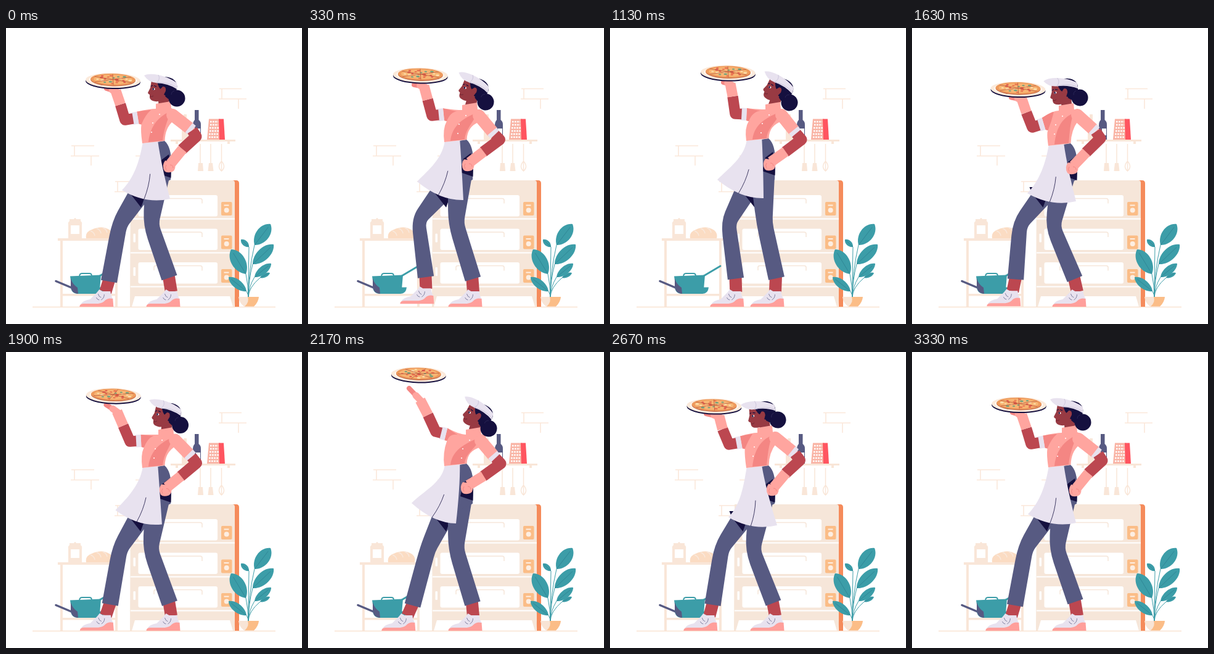
An HTML page that plays this animation: 480 by 480 pixels, repeating every 4 s.

```html
<!DOCTYPE html>
<html lang="en">
<head>
<meta charset="utf-8">
<title>Pizza chef</title>
<style>
html, body { margin: 0; width: 100%; height: 100%; overflow: hidden; background: #fff; }
svg { display: block; width: 100%; height: 100%; }
</style>
</head>
<body>
<svg viewBox="0 0 480 480" fill="none">
  <g stroke="#fbe8da" stroke-width="1.6">
    <path d="M106 191H143M111 191V207.500M105 207.500H151M138 207.500V223M346 98.500H382M350 98.500V115M345 115H390M377 115V131M177 249H202M181 249V265.500M176 265.500H202M210 207.500H225"/>
    <path stroke="#f9e3d2" d="M43 452.500H437"/>
  </g>
  <g id="shelf">
    <path fill="#f9e6d8" d="M267 181h105v3h-105zM275 184h4v4h-4zM359 184h4v4h-4zM288 140h5v11q4 3 4 8v22h-12v-22q0-5 3-8z"/>
    <path fill="#575a82" d="M306 133h6.500v16q4 3 3.500 9v23h-13v-23q0-6 3-9z"/>
    <path fill="#fff" d="M308 163h7v11h-7z"/>
    <path fill="#f9b4a5" d="M329 147.500h18v33.500h-21z"/>
    <path fill="#ff5560" d="M345 147.500h8l2 33.500h-9z"/>
    <path stroke="#fff" stroke-width="2.600" stroke-dasharray="2.600 1.500" d="M331 152h13M331 157h13M330 162h15M330 167h15M329 172h16M329 177h16"/>
    <path stroke="#f9e6d8" stroke-width="1.500" d="M315 188V220M332 188V220M349.500 188V217M349.500 216q-8 9 0 16q8-7 0-16zM349.500 216V232"/>
    <path fill="#f9e6d8" d="M312 219h7l1 13h-9zM329 219h6l1.500 13h-9z"/>
  </g>
  <g id="oven">
    <path fill="#f58b5b" d="M364 247h9q5 0 5 5v200h-7z"/>
    <path fill="#f6e6d9" d="M202 247h165q4 0 4 4v184l-1 17h-2l-5-17h-154l-5 17h-3z"/>
    <path stroke="#fff" stroke-width="1.800" d="M202 309.500h169M202 364.500h169M202 419.500h169"/>
    <g id="decks"></g>
  </g>
  <g id="table">
    <path fill="#f9e6d8" d="M84 341h99v4h-99zM88 345h4v107h-4zM177 345h4v107h-4zM92 431h85v3.500h-85zM103 310h7q2-4 4 0h7v3q3 2 2 6v22h-22v-22q-1-4 2-6z"/>
    <path fill="#fff" d="M105 320h14v14h-14z"/>
    <path fill="#fbdcc3" d="M130 341q-2-10 9-14q17-8 30 1q6 5 4 13z"/>
    <path stroke="#f9e8dc" stroke-width="1.500" d="M137 329q6 2 7 8M147 325q6 2 7 8M157 324q6 2 7 8"/>
    <path stroke="#575a82" stroke-width="3.500" stroke-linecap="round" d="M81 410.500L106 421"/>
    <path stroke="#3c9da8" stroke-width="2.800" stroke-linecap="round" d="M152 402L179 386"/>
    <path stroke="#3c9da8" stroke-width="2" d="M119 404q0-6 4-6h12q4 0 4 4"/>
    <path fill="#3c9da8" d="M104 402.500L154 400.500L152 424H112Q105 415 104 402.500zM105 420.500H160Q159 431 150 431H115Q106 430 105 420.500z"/>
    <path fill="#575a82" d="M105 406Q108 416 116 421L117 431Q106 430 105 420z"/>
  </g>
  <g id="plant">
    <path fill="#f8e4d5" d="M377 436h33q-1 9-8 15.500h-16q-8-6-9-15.500z"/>
    <path fill="#fbbd87" d="M392 436h18q-1 9-8 15.500h-15q8-7 5-15.500z"/>
  </g>
  <g id="chef"></g>
</svg>
<script>
const LOOP = 4000;
const SLATE = '#575a82', NAVY = '#15103f', PINK = '#ffa59f', ROSE = '#f48683',
      ARM = '#bc4750', FACE = '#983a43', LILAC = '#e8e2ef', TEAL = '#3c9da8';
const get = id => document.getElementById(id);

const at = p => p[0].toFixed(2) + ' ' + p[1].toFixed(2);
const add = (p, x, y) => [p[0] + x, p[1] + y];
const mix = (a, b, u) => [a[0] + (b[0] - a[0]) * u, a[1] + (b[1] - a[1]) * u];
const toward = (a, b, len) => mix(a, b, len / Math.hypot(b[0] - a[0], b[1] - a[1]));
const fill = (d, c) => `<path d="${d}" fill="${c}"/>`;
const line = (d, c, w, cap = 'butt') =>
  `<path d="${d}" stroke="${c}" stroke-width="${w}" stroke-linecap="${cap}" stroke-linejoin="round"/>`;
const poly = pts => 'M' + pts.map(at).join('L');
const oval = (x, y, rx, ry, c) => `<ellipse cx="${x}" cy="${y}" rx="${rx}" ry="${ry}" fill="${c}"/>`;

// Fixed scenery
get('decks').innerHTML = [271, 325.5, 380].map((y, i) => `
  <rect x="214.500" y="${y}" width="128.500" height="34.500" rx="3" fill="#fff"/>
  <path d="M240 ${y + 13}v-5q0-2.500 3-2.500h72q3 0 3 3v5" stroke="#f6e6d9" stroke-width="1.500"/>
  <rect x="349" y="${y + 11}" width="17.500" height="22" rx="2" fill="#fbbd87"/>
  <circle cx="357.700" cy="${y + 24.5}" r="4" fill="#fdeee2"/>
  <path d="M353.500 ${y + 16.5}h8" stroke="#fdeee2" stroke-width="2"/>
  ${i ? `<rect x="206.500" y="${y + 8}" width="3.500" height="14" rx="1" fill="#fff"/>` : ''}`).join('');

function leaf(a, b, w) {
  const len = Math.hypot(b[0] - a[0], b[1] - a[1]);
  const nx = -(b[1] - a[1]) / len * w, ny = (b[0] - a[0]) / len * w;
  const p = mix(a, b, .25), q = mix(a, b, .8), k = .72;
  return line(`M393 437Q${at([393, (a[1] + 437) / 2])} ${at(a)}`, TEAL, 1) +
    fill(`M${at(a)}C${at(add(p, nx * k, ny * k))} ${at(add(q, nx * k, ny * k))} ${at(b)}` +
      `C${at(add(q, -nx * k, -ny * k))} ${at(add(p, -nx * k, -ny * k))} ${at(a)}`, TEAL) +
    line(poly([a, mix(a, b, .85)]), '#2c7d8e', .7);
}
get('plant').insertAdjacentHTML('afterbegin',
  leaf([403, 352], [429, 318], 20) + leaf([394, 355], [381, 343], 8) +
  leaf([389, 399], [365, 359], 21) + leaf([400, 383], [434, 351], 18) +
  leaf([403, 404], [430, 382], 12) + leaf([412, 405], [428, 397], 6) +
  leaf([390, 427], [361, 404], 13));

// Each pose: head tilt, waist height, front foot shift, then joint positions
const JOINTS = ['head', 'palm', 'tip', 'wrist', 'elbow', 'cuff', 'neck', 'shoulder', 'cuff2', 'elbow2',
  'wrist2', 'fist', 'hemL', 'hemR', 'knee', 'ankle', 'knee2', 'ankle2'];
const rest = [0, 184, 0, 277, 114, 178, 102, 163, 98, 185.5, 124, 193, 149, 205, 147, 255, 121, 270, 141,
  302, 166, 308.5, 176, 285.5, 197, 265, 225, 188, 263, 266, 277, 184, 318, 167, 411, 235, 319, 265, 405];
const back = [12.7, 182, 30, 288, 120, 188, 94, 172, 92, 194, 116, 201, 142, 211, 141, 262, 123, 277, 142,
  303, 173, 311, 181, 284, 201, 260, 223, 177, 249, 252, 279, 179, 312, 191, 404, 240, 317, 267.5, 407];
const stand = [16.4, 180, 43, 291, 121, 195, 90, 184, 88, 199, 111, 203, 139, 212.5, 139.5, 264, 122, 278, 141,
  302, 171, 310.5, 181, 284, 201, 259, 222, 174, 246, 249, 276, 192, 316, 204, 406.5, 250.5, 317, 270, 406];
const crouch = [-10.4, 188, 2, 272, 113, 178, 115, 161, 112.5, 185.5, 137, 195, 161, 205, 158, 250, 124, 268, 141,
  298, 168, 305.5, 179, 282, 202, 260, 228, 187, 268, 266, 281, 175, 318, 168, 407.5, 228.5, 322, 264, 407];
const toss = [18, 182, 0, 293, 124, 182, 78, 164, 59, 194.5, 102, 207, 129, 215, 131, 268, 124, 280, 144,
  304, 172, 312.5, 181, 284, 201.5, 258, 221, 168, 245, 240, 278, 194, 320, 169.5, 411, 240, 319, 267, 408];
const grab = [-13, 185, 0, 272, 110, 177, 104, 156, 100, 182.5, 125, 193, 150, 204, 148, 251, 121, 268, 139,
  300, 165, 308, 175.5, 284.5, 197, 264, 224, 192, 268, 271, 281, 181, 318, 166.5, 410, 231.5, 321, 265, 407];
const tall = stand.slice();
tall[1] -= 1;
tall[6] -= 3;
tall[10] -= 3;
tall[21] += 1.5;

const POSE_T = [0, 330, 560, 1130, 1630, 2170, 2670, 3270, LOOP];
const POSES = [rest, back, tall, stand, crouch, toss, grab, rest, rest];
const PLATE_T = [0, 330, 560, 1130, 1630, 1880, 2030, 2170, 2230, 2400, 2540, 2670, 3230, LOOP];
const PLATE_X = [173.5, 182.3, 191, 191.5, 172, 174, 177, 179.3, 179.3, 176, 172, 169, 173.5, 173.5];
const PLATE_Y = [85.5, 77, 68, 73, 99.5, 74, 50, 37, 35, 45, 67, 88, 85.5, 85.5];

// Monotone cubic track: eases at turning points, flows through the others
function track(ts, vs, t) {
  let i = 0;
  while (i < ts.length - 2 && t >= ts[i + 1]) i++;
  const slope = k => (vs[k + 1] - vs[k]) / (ts[k + 1] - ts[k]);
  const tangent = k => {
    if (k < 1 || k > ts.length - 2) return 0;
    const a = slope(k - 1), b = slope(k);
    return a * b <= 0 ? 0 : 2 * a * b / (a + b);
  };
  const h = ts[i + 1] - ts[i], u = (t - ts[i]) / h, w = 1 - u;
  return (1 + 2 * u) * w * w * vs[i] + u * w * w * h * tangent(i) +
    u * u * (3 - 2 * u) * vs[i + 1] - u * u * w * h * tangent(i + 1);
}

function poseAt(t) {
  const v = rest.map((_, k) => track(POSE_T, POSES.map(p => p[k]), t));
  const j = { tilt: v[0], waist: v[1], step: v[2] };
  JOINTS.forEach((n, k) => j[n] = [v[3 + 2 * k], v[4 + 2 * k]]);
  return j;
}

function leg(hip, knee, hem, wHip) {
  const normal = (a, b) => {
    const l = Math.hypot(b[0] - a[0], b[1] - a[1]);
    return [-(b[1] - a[1]) / l, (b[0] - a[0]) / l];
  };
  const n1 = normal(hip, knee), n2 = normal(knee, hem), nk = mix(n1, n2, .5);
  const side = s => [add(hip, n1[0] * wHip * s, n1[1] * wHip * s),
    add(knee, nk[0] * 13 * s, nk[1] * 13 * s), add(hem, n2[0] * 13.2 * s, n2[1] * 13.2 * s)];
  const [a, b, c] = side(1), [d, e, f] = side(-1);
  return fill(`M${at(a)}L${at(mix(b, a, .25))}Q${at(b)} ${at(mix(b, c, .25))}L${at(c)}L${at(f)}` +
    `L${at(mix(e, f, .1))}Q${at(e)} ${at(mix(e, d, .1))}L${at(d)}z`, SLATE);
}

const shoe = (x, y) => `<g transform="translate(${x.toFixed(2)} ${y.toFixed(2)})">` +
  fill('M2-4Q5-10 17-12L28-23L32-28L37-25L50-25Q51-17 54-13L52-3z', LILAC) +
  fill('M0 0Q0-4.500 6-5H30Q38-6 41-10Q46-15 54-13L55 0z', '#ff9f9b') +
  line('M30-21q1 5 5 6M27-15q2 4 5 4M35-11q5-3 5-9', SLATE, .7) + '</g>';

function head(j) {
  return `<g transform="translate(${at(j.head)}) rotate(${j.tilt.toFixed(2)})">` +
    fill('M-35-28Q-22-38-10-33Q2-28 0-16Q-3 0-14 1L-27-10z', NAVY) +
    '<circle r="13.500" fill="' + NAVY + '"/>' +
    line('M-9-6Q-9-11-4-12', '#35305f', .7) +
    fill('M-41-29L-43-17L-47-9Q-46-6-44-6L-44-1Q-43 4-35 5Q-27 6-21 0L-16-8L-18-24z', FACE) +
    fill('M-32-27Q-29-16-26-15L-23-19Q-17-20-18-12L-21-6Q-15-2-11-2L-6-22z', NAVY) +
    oval(-23, -13, 3.4, 4.2, FACE) +
    oval(-37.5, -15, 2.2, 1.6, '#fff') + oval(-38.2, -15, 1.2, 1.7, NAVY) +
    line('M-42-19.500L-39-21M-37-20.500L-33-19', NAVY, 1.1) +
    line('M-43-3Q-40-2-38-4', '#6b2431', .9) +
    fill('M-53-37Q-46-41-30-38Q-12-34 0-25L0-15Q-14-24-33-25Q-46-26-53-37z', LILAC) +
    line('M-33-25Q-26-31-30-38M-33-25Q-15-27-1-18', '#c8c1d8', .8) + '</g>';
}

function pizza(x, y, spin) {
  let s = `<g transform="translate(${x.toFixed(2)} ${y.toFixed(2)}) rotate(1.500)">` +
    oval(0, 1.5, 44.5, 12, NAVY) + oval(0, -.5, 44.5, 12, '#fbeadb') +
    oval(0, -.5, 39, 10.3, '#fff8f0') + oval(0, -1, 36.5, 10, '#c9704a') +
    oval(0, -2, 36.5, 9.5, '#ee9a5c') + oval(0, -2, 31.5, 7.8, '#f7b573');
  const colors = ['#e0524a', '#fbe0ae', '#6fa07c', '#e8704f'];
  for (let i = 0; i < 22; i++) {
    const a = i * 2.4 + spin, r = 28 * Math.sqrt((i + 1) / 22);
    s += oval((Math.cos(a) * r).toFixed(2), (Math.sin(a) * r * .25 - 2).toFixed(2),
      i % 3 ? 2.2 : 3, i % 3 ? 1 : 1.3, colors[i % 4]);
  }
  for (let i = 0; i < 3; i++) {
    const a = spin + .5 + i * Math.PI / 3, dx = Math.cos(a) * 34, dy = Math.sin(a) * 8.8;
    s += line(poly([[-dx, -dy - 2], [dx, dy - 2]]), '#b9573f', .8);
  }
  return s + '</g>';
}

function legs(j) {
  const lift = -6 * Math.sin(Math.PI * Math.min(43, Math.max(0, j.step)) / 43);
  const footX = 119.3 + j.step, gap = j.knee2[0] - 14, w = j.waist;
  return line(poly([mix(j.ankle, j.knee, .05), [footX + 42, 428 + lift]]), ARM, 20) +
    shoe(footX, 452 + lift) +
    line(poly([mix(j.ankle2, j.knee2, .05), [268, 428]]), ARM, 20) + shoe(227.5, 452) +
    leg([224, 257], j.knee, j.ankle, 18) +
    fill(poly([[gap - 24, 258], [gap - 20, 268], [gap - 2, 291], [gap + 3, 277], [gap + 6, 258]]), NAVY) +
    leg([247, 230], j.knee2, j.ankle2, 20.5) +
    fill(`M222 ${w + 5}L257 ${w - 1}C265 ${w + 6} 268 ${w + 18} 268 ${w + 36}L267 246L228 264z`, SLATE) +
    fill(`M247 ${w + 52}L267.500 ${w + 59}L268 ${w + 38}L264 ${w + 21}L252 ${w + 30}z`, NAVY);
}

function apron(j) {
  const w = j.waist, l = j.hemL, r = j.hemR, mid = [246.3, w];
  const low = add(mix(l, r, .46), 0, 8);
  return fill(`M221.500 ${w + 3}L${at(mid)}Q${at([248 + (r[0] - 247) * .2, w + 38])} ${at(r)}` +
    `Q${at(add(mix(l, r, .5), 0, 16))} ${at(l)}C${at(add(l, 20, -20))} ${at([217, w + 30])} 221.500 ${w + 3}z`, LILAC) +
    line(`M${at(low)}Q${at(add(toward(low, mid, 22), 3, 1))} ${at(toward(low, mid, 42))}`, NAVY, .8);
}

function shirt(j) {
  const w = j.waist, n = j.neck;
  const end = toward(j.elbow, j.cuff, Math.hypot(j.cuff[0] - j.elbow[0], j.cuff[1] - j.elbow[1]) + 9);
  const d = toward(j.elbow, end, 1), ux = d[0] - j.elbow[0], uy = d[1] - j.elbow[1];
  const top = add(end, uy * 10, -ux * 10), bot = add(end, -uy * 10, ux * 10);
  const a = j.tilt * Math.PI / 180, c = Math.cos(a), s = Math.sin(a);
  const jaw = add(j.head, -22 * c + 4 * s, -22 * s - 4 * c);
  return line(poly([jaw, add(n, 1, 4)]), FACE, 17) +
    fill(`M${at(add(n, -12, 2))}Q${at(n)} ${at(add(n, 12, -2))}L${at(add(n, 13, 9))}` +
      `Q${at(add(n, 22, 12))} ${at(add(j.shoulder, 8, -6))}L${at(add(j.shoulder, 1, 10))}` +
      `Q258 ${w - 22} 257.500 ${w - 1}L221 ${w + 3}Q218 ${w - 18} ${at(add(bot, 4, 1))}L${at(bot)}L${at(top)}` +
      `Q${at(add(n, -22, 10))} ${at(add(n, -12, 10))}z`, PINK) +
    fill(`M${at(top)}Q${at(add(n, -24, 12))} ${at(add(n, -20, 12))}Q${at(add(bot, 10, -14))} ${at(add(bot, 4, 1))}L${at(bot)}z`, ROSE) +
    fill(`M${at(add(n, 12, 14))}C${at(add(n, -7, 22))} 234 ${w - 26} 231 ${w + 1}` +
      `L254 ${w - 1}C256 ${w - 20} ${at(add(n, 6, 32))} ${at(add(n, 12, 14))}z`, ROSE) +
    [[-6, 19], [-17, 33], [-19, 48]].map(b => oval(n[0] + b[0], n[1] + b[1], 1, 1, '#fff')).join('') +
    line(poly([j.cuff, end]), LILAC, 20);
}

function frontArm(j) {
  return line(poly([j.wrist, j.elbow, toward(j.cuff, j.elbow, -1)]), ARM, 17.5) +
    line(poly([j.palm, j.wrist]), PINK, 17) +
    line(poly([j.tip, add(j.palm, 1, 1)]), ROSE, 8, 'round') +
    line(poly([mix(j.tip, j.palm, .6), add(j.palm, 2, 2)]), PINK, 11, 'round');
}

function rearArm(j) {
  const cuff = toward(j.cuff2, j.shoulder, 7), w = j.wrist2, f = j.fist;
  return line(poly([j.shoulder, cuff]), PINK, 20, 'round') +
    line(poly([cuff, j.cuff2]), LILAC, 19) +
    line(poly([j.cuff2, j.elbow2, w]), ARM, 18) +
    line(poly([toward(w, j.elbow2, 1), add(f, 2, -5)]), PINK, 17) +
    fill(`M${at(add(f, -7, -10))}L${at(add(f, 8, -8))}Q${at(add(f, 12, 4))} ${at(add(f, 5, 8))}` +
      `Q${at(add(f, -4, 11))} ${at(add(f, -8, 7))}Q${at(add(f, -13, -2))} ${at(add(f, -7, -10))}z`, PINK) +
    line(`M${at(add(f, -5, 5))}q-3-4 0-8M${at(add(f, 1, -3))}q5 0 5 5`, ROSE, 1);
}

function spinAt(t) {
  const u = Math.min(1, Math.max(0, (t - 1750) / 900));
  return Math.PI * u * u * (3 - 2 * u);
}

function draw(t) {
  const j = poseAt(t);
  get('chef').innerHTML = legs(j) + apron(j) + shirt(j) + head(j) + rearArm(j) + frontArm(j) +
    pizza(track(PLATE_T, PLATE_X, t), track(PLATE_T, PLATE_Y, t), spinAt(t));
}

const start = performance.now();
function tick(now) {
  draw(Math.max(0, now - start) % LOOP);
  requestAnimationFrame(tick);
}
draw(0);
requestAnimationFrame(tick);
</script>
</body>
</html>
```
